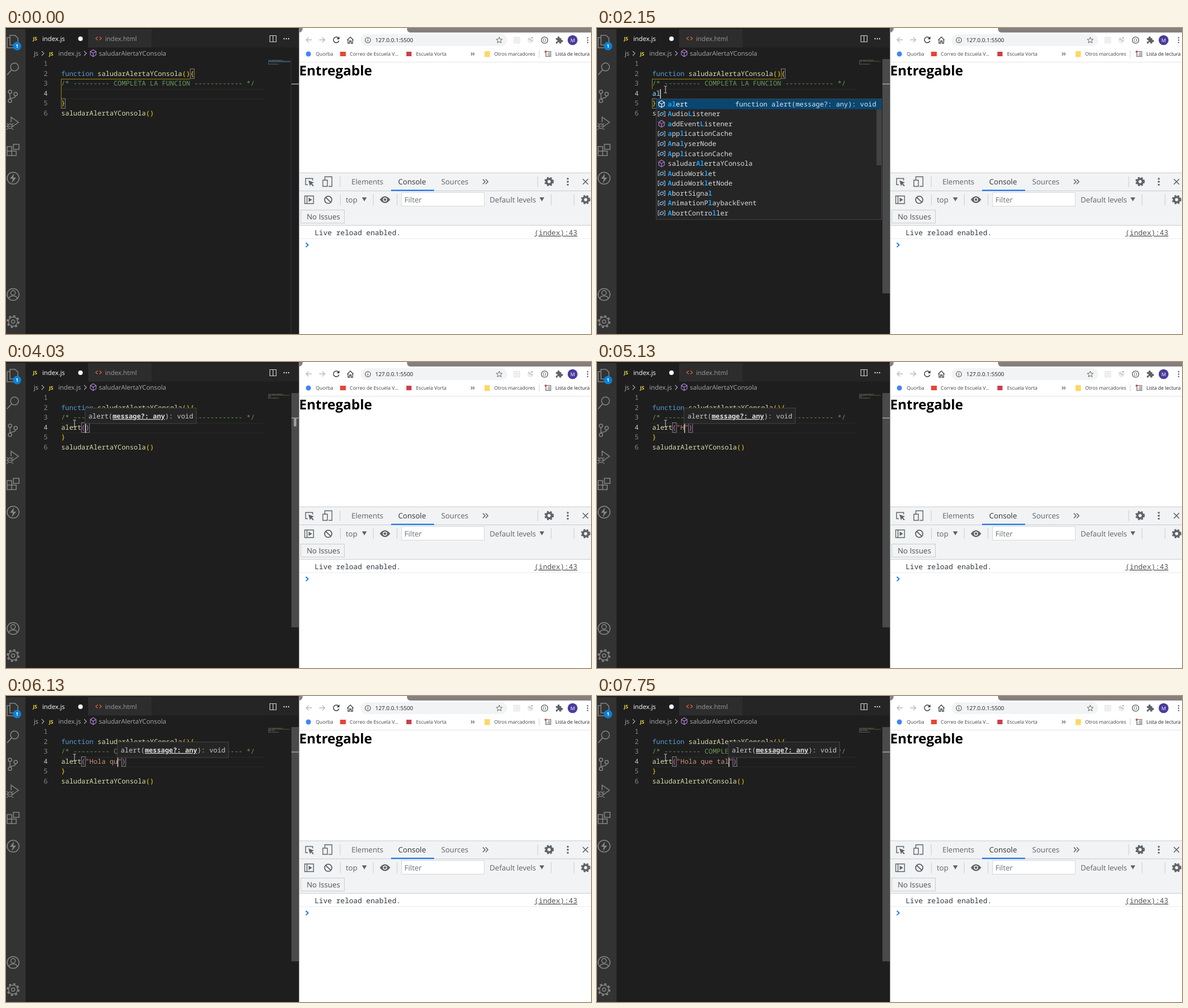
An HTML page for the animation above (8000 ms loop, 1033x542 px).

```html
<!DOCTYPE html>
<html lang="es">
<head>
<meta charset="utf-8">
<title>Entregable</title>
<style>
html, body { margin: 0; width: 100%; height: 100%; overflow: hidden; background: #fff; }
svg { display: block; }
text { white-space: pre; text-rendering: geometricPrecision; }
.m { font: 500 11.86px "Noto Sans Mono", monospace; }
.u { font: 11.3px "Open Sans", "Noto Sans", sans-serif; }
.d { font: 13.1px "Open Sans", "Noto Sans", sans-serif; }
.b { font: 8.6px "Open Sans", "Noto Sans", sans-serif; }
.c { font: 12.67px "Noto Sans Mono", monospace; }
</style>
</head>
<body>
<svg id="stage" width="1033" height="542" viewBox="0 0 1033 542">
  <g id="fixed"></g><g id="live"></g>
</svg>
<script>
const LOOP = 8000, CW = 7.116, X0 = 97.5, ROW = 17.6;
const colX = c => X0 + c * CW;
const lineY = n => 67 + (n - 1) * ROW;

const rect = (x, y, w, h, fill, more = '') =>
  `<rect x="${x}" y="${y}" width="${w}" height="${h}" fill="${fill}" ${more}/>`;
const frame = (x, y, w, h, fill, stroke) => rect(x, y, w, h, fill, `stroke="${stroke}"`);
const circle = (x, y, r, fill, more = '') =>
  `<circle cx="${x}" cy="${y}" r="${r}" fill="${fill}" ${more}/>`;
const ring = (x, y, r, stroke, w = 1.5, more = '') =>
  circle(x, y, r, 'none', `stroke="${stroke}" stroke-width="${w}" ${more}`);
const line = (d, stroke, w = 1.5, fill = 'none') =>
  `<path d="${d}" fill="${fill}" stroke="${stroke}" stroke-width="${w}"/>`;
const shape = (d, fill) => `<path d="${d}" fill="${fill}"/>`;
const esc = s => s.replace(/&/g, '&amp;').replace(/</g, '&lt;');
const text = (cls, x, y, s, fill, style = '') =>
  `<text class="${cls}" x="${x}" y="${y}" fill="${fill}" style="${style}">${esc(s)}</text>`;
// parts: [string, colour, extra attributes]
const rich = (x, y, parts) => `<text class="m" x="${x}" y="${y}">` +
  parts.map(([s, f, more = '']) => `<tspan fill="${f}" ${more}>${esc(s)}</tspan>`).join('') + '</text>';

function gear(x, y, r, color) {
  const step = 2 * Math.PI * r / 16;
  return ring(x, y, r * .62, color, r * .5) +
    ring(x, y, r * .95, color, r * .3, `stroke-dasharray="${step} ${step}"`);
}
const outlineGear = (x, y) => ring(x, y, 3, '#858585') + ring(x, y, 8, '#858585', 1.4) +
  ring(x, y, 10, '#858585', 2.6, 'stroke-dasharray="3.9 3.95"');
const cube = (x, y, color) =>
  line(`M${x} ${y - 6}l5 3v6l-5 3l-5 -3v-6zM${x - 5} ${y - 3}l5 3l5 -3M${x} ${y}v6`, color, 1.1);
const dots = (x, y, dx, dy, color, r = 1.2) =>
  [-1, 0, 1].map(i => circle(x + i * dx, y + i * dy, r, color)).join('');
const jsTag = (x, y) => text('b', x, y, 'JS', '#ead94a', 'font-weight:700');

function editor() {
  const g = '#858585', t = '#a9a9a9';
  let s = rect(0, 0, 517, 542, '#1e1e1e') + rect(0, 2, 34.5, 540, '#333333') +
    rect(34.5, 2, 482.5, 32.5, '#252526') + rect(35, 2, 110, 33, '#1e1e1e') + rect(145, 2, 112, 32.5, '#2d2d2d');
  // activity bar
  s += line('M7 17v-4h9l5 5v12h-14zM7 17H2v18h12v-5', g) +
    circle(19.5, 32, 7.4, '#0a80d4') + text('b', 17, 35.2, '1', '#fff', 'font-weight:700') +
    ring(15, 69, 7, g) + line('M10 74L2 83', g, 1.8) +
    ring(7, 113, 3, g) + ring(17, 117, 3, g) + ring(7, 129, 3, g) + line('M7 116v10M17 120c0 5 -8 3 -10 6', g) +
    line('M9 167v-9l13 9l-10 7', g) + ring(7, 174, 4, g) + line('M3 174h8M1 169l3 2M13 169l-3 2M0 174h3M11 174h3M1 180l3 -2M13 180l-3 -2', g, 1.2) +
    line('M2 210h8v16h-8zM2 218h16v8h-16M13 206h10v9h-10z', g) +
    ring(12.5, 266, 10.5, g) + shape('M14 258l-7 9h5l-2 8l8 -10h-5z', g) +
    ring(12.5, 472, 10.5, g) + ring(12.5, 469, 4, g) + line('M5 479c2 -6 13 -6 15 0', g) + outlineGear(12.5, 520);
  // tabs and breadcrumbs
  s += jsTag(47.5, 22) + text('u', 64, 23, 'index.js', '#fff') + circle(131.5, 19, 4, '#fff') +
    line('M162 15.5l-3.5 3l3.5 3M165 15.5l3.5 3l-3.5 3', '#d0602f', 1.4) + text('u', 175, 23, 'index.html', '#9a9a9a') +
    line('M466 13.5h11v11h-11zM471.5 13.5v11', '#d0d0d0', 1.2) + dots(495, 19, 4, 0, '#d0d0d0') +
    text('u', 49, 49, 'js', t) + line('M63 41l4 4l-4 4M138 41l4 4l-4 4', t, 1.1) + jsTag(76, 48.5) +
    text('u', 92.5, 49, 'index.js', t) + cube(154, 44.5, '#b180d7') + text('u', 164, 49, 'saludarAlertaYConsola', t);
  // code
  for (let n = 1; n < 7; n++) s += text('m', 66.4, lineY(n), String(n), n === 4 ? '#c6c6c6' : g);
  s += line('M97 108.5h360M97 125.5h360', '#292929', 1) +
    rich(X0, lineY(2), [['function ', '#569cd6'], ['saludarAlertaYConsola', '#dcdcaa'], ['(){', '#ffd700']]) +
    text('m', X0, lineY(3), '/* ' + '-'.repeat(9) + ' COMPLETA LA FUNCION ' + '-'.repeat(12) + ' */', '#6a9955') +
    text('m', X0, lineY(5), '}', '#ffd700') +
    rich(X0, lineY(6), [['saludarAlertaYConsola', '#dcdcaa'], ['()', '#ffd700']]);
  return s;
}

function browser() {
  const k = '#5f6368', n = '#3c4043', sep = (x, y) => rect(x, y, 1, 19, '#cacdd1');
  let s = rect(517, 0, 516, 542, '#fff') + shape('M517 0h7q-1 8 -7 8z', '#85807e') +
    shape('M708 0H1033V8H714Q708 8 708 0z', '#85807e');
  // address bar
  s += line('M540 21h-10M534.5 16.5l-4.5 4.5l4.5 4.5M553 21h10M558.5 16.5l4.5 4.5l-4.5 4.5', '#b9bbbe', 1.4) +
    line('M587.5 18.5a5 5 0 1 0 .5 4', n, 1.5) + shape('M588.8 15v5h-5z', n) +
    line('M602.5 21.5l5.5 -5.5l5.5 5.5M604 20.5v6.5h2.7v-4h2.7v4h2.7v-6.5', n, 1.3) +
    rect(626, 11, 259, 21, '#f1f3f4', 'rx="10.5"') + ring(639, 21.5, 4.7, k, 1.2) + line('M639 20.5v3.5M639 18.4v1.2', k, 1.2) +
    text('b', 652, 25.2, '127.0.0.1:5500', '#202124', 'font-size:9.9px') +
    line('M871 16.3l1.5 3.5l3.8 .3l-2.9 2.5l.9 3.7l-3.3 -2l-3.3 2l.9 -3.7l-2.9 -2.5l3.8 -.3z', k, 1) +
    frame(897, 16.5, 10, 10, '#f6f6f6', '#dedede') + ring(902, 21.5, 2.3, '#dedede', 1) +
    circle(926, 21.5, 5.5, '#ededed') + dots(926, 21, 2.5, 1.5, '#a5a5a5', .9) + circle(929, 17, 1, '#888') +
    ring(951, 21.5, 5.7, n, 1.1) + text('b', 948.1, 24.2, '()', n) +
    shape('M971 18h3a2 2 0 1 1 3.5 0h3v3.3a2 2 0 1 1 0 3.5v2.7h-3.5a1.7 1.7 0 1 0 -3 0h-3v-3.5a1.8 1.8 0 1 0 0 -3z', k) +
    circle(1000.5, 21.5, 8.7, '#4a3b9c') + text('b', 996.7, 24.7, 'M', '#fff') + dots(1027, 21.5, 0, 4.2, k, 1.2);
  // bookmarks
  s += circle(534, 46, 4.5, '#4285f4') + text('b', 547, 49.2, 'Quorba', n) +
    rect(590, 42, 10, 8, '#ea4335') + text('b', 607, 49.2, 'Correo de Escuela V...', n) +
    rect(707, 42, 9, 8, '#c9404c') + text('b', 724, 49.2, 'Escuela Vorta', n) +
    line('M821 43.5l2.5 2.5l-2.5 2.5M824.5 43.5l2.5 2.5l-2.5 2.5', k, 1.1) +
    rect(845, 41, 9.5, 10.5, '#fbd867', 'rx="1"') + text('b', 862, 49.2, 'Otros marcadores', n) + rect(941, 40, 1, 12, '#d0d2d5') +
    frame(953, 41.5, 9, 9, '#fff', k) + line('M957 44h4M957 46.3h4M957 48.6h4M954.3 46.3h1.4M954.3 48.6h1.4', k, 1) +
    circle(953, 42, 2, '#d94b3d') + text('b', 970, 49.2, 'Lista de lectura', '#202124') + rect(517, 60, 516, 1, '#e4e5e7') +
    text('u', 517.5, 84, 'Entregable', '#000', 'font-size:24px;font-weight:700');
  // developer panel
  s += rect(517, 256, 516, 94, '#f1f3f4') + rect(517, 256, 516, 1, '#cacdd1') + rect(517, 288, 516, 1, '#cacdd1') +
    rect(517, 349, 516, 1, '#cacdd1') + rect(680, 286.5, 76, 2.2, '#1a73e8');
  s += line('M541.5 270v-3.5h-12.5v11h4', k, 1.4) + shape('M534 270l10 3.8l-4 1.5l3.5 3.6l-1.5 1.5l-3.5 -3.6l-1.6 3.4z', k) +
    line('M563 269v-5.5h12.5v17h-6M559.5 269.5h8v11h-8z', k, 1.4) + sep(589.5, 263) +
    text('d', 610, 277, 'Elements', k) + text('d', 692.5, 277, 'Console', '#333') + text('d', 768.5, 277, 'Sources', k) +
    line('M842 268l4 4.3l-4 4.3M847 268l4 4.3l-4 4.3', k, 1.5) + sep(938.5, 263) +
    gear(959, 272, 7.6, k) + dots(992, 272.3, 0, 5.3, k, 1.7) + line('M1018.5 267.5l9.5 9.5M1028 267.5l-9.5 9.5', k, 1.6);
  s += line('M527.5 297.5h15.5v13.5h-15.5zM531.5 297.5v13.5', k, 1.4) + shape('M534.5 300.5l6 3.8l-6 3.8z', k) +
    ring(569, 304.3, 6.4, k, 1.8) + line('M564.5 300l9 8.7', k, 1.8) + sep(590, 294.5) +
    text('d', 600, 308.8, 'top', k) + shape('M628.5 300h8.5l-4.25 7z', k) + sep(648, 294.5) +
    shape('M660 304q9 -12 18.5 0q-9.5 12 -18.5 0z', k) + circle(669.2, 304, 3.7, '#f1f3f4') + circle(669.2, 304, 2.2, k) + sep(690, 294.5) +
    frame(698.5, 291.5, 146, 24, '#fff', '#d6d8db') + text('d', 703.5, 308.8, 'Filter', '#6b6f74') +
    text('d', 854, 308.8, 'Default levels', k) + shape('M942 300h8.5l-4.25 7z', k) + sep(962, 294.5) + sep(1002.5, 294.5) + gear(1023.5, 304, 7.6, k);
  s += frame(520.5, 322.5, 77, 23, '#f1f3f4', '#cacdd1') + text('d', 531, 339.2, 'No Issues', '#4c4f53') +
    text('c', 545, 367, 'Live reload enabled.', '#303942') +
    text('c', 933, 367, '(index):43', '#545454', 'text-decoration:underline') + rect(517, 372.5, 516, 1, '#ececec') +
    line('M529.5 380.5l4 3.8l-4 3.8', '#1a78e0', 1.8);
  // window edge
  return s + rect(517, 0, 1, 542, '#8a8a8a');
}

// [key time, time the parameter hint catches up]
const KEYS = [[1990], [2150], [2390], [2540], [2620], [3880, 4030], [4260, 4350], [4980, 5130], [5280, 5357],
  [5434, 5511], [5588, 5665], [5740, 5819], [5896, 5973], [6050, 6130], [6207, 6285], [6362, 6440], [6515, 6595],
  [6595, 6672], [6672, 6750]];
const CARET_OFF = [[0, 1045], [1510, 1990], [3490, 3880], [4730, 4980], [7200, 7750]];
const POINTER = [[230, 886, 510], [313, 700, 430], [396, 480, 330], [479, 300, 240], [562, 180, 175], [645, 123, 150],
  [728, 165, 160], [810, 253, 170], [960, 215, 150], [1045, 150, 118], [1130, 121, 109]];
const WORDS = ['alert', 'AudioListener', 'addEventListener', 'applicationCache', 'AnalyserNode', 'ApplicationCache',
  'saludarAlertaYConsola', 'AudioWorklet', 'AudioWorkletNode', 'AbortSignal', 'AnimationPlaybackEvent', 'AbortController'];
const LAST = ['alert', 'saludarAlertaYConsola', 'DeviceAcceleration', 'SpeechRecognitionAlternative'];
const METHODS = ['alert', 'addEventListener', 'saludarAlertaYConsola'];
const MESSAGE = 'Hola que tal';

// places of the typed letters inside a suggestion, or null
function match(word, key) {
  let at = /^a/i.test(word) ? 0 : word.indexOf('A');
  const hits = [];
  for (const ch of key) {
    at = word.toLowerCase().indexOf(ch, at);
    if (at < 0) return null;
    hits.push(at++);
  }
  return hits;
}

function suggestions(t) {
  const key = 'alert'.slice(0, t < 2150 ? 1 : t < 2390 ? 2 : t < 2620 ? 3 : 5);
  const words = key.length > 3 ? LAST : key.length > 2 ? WORDS.filter(w => match(w, key)).slice(0, 9) : WORDS;
  let s = frame(104.5, 125.5, 398, words.length * ROW + 2.4, '#252526', '#454545') + rect(105, 126, 397.5, ROW, '#094771');
  words.forEach((w, i) => {
    const y = 134.6 + i * 17.56, hits = match(w, key), fg = i ? '#dedede' : '#fff';
    s += METHODS.includes(w) ? cube(114, y, i ? '#b180d7' : '#fff') :
      line(`M110.5 ${y - 4}h-2.5v8h2.5M117.5 ${y - 4}h2.5v8h-2.5`, '#b5b5b5', 1.1) +
      line(`M111 ${y}l3.5 -2.5l2.7 1.3v2l-3.5 2.2l-2.7 -1.2z`, '#75beff', 1.2);
    s += rich(125, y + 4.1, [...w].map((ch, j) => hits.includes(j) ? [ch, '#18a3ff', 'font-weight="700"'] : [ch, fg]));
  });
  s += text('m', 244, 138.7, 'function alert(message?: any): void', '#d9e4ec');
  if (words.length > 9) s += rect(493.5, 144, 8.5, 99, '#424242');
  return s;
}

function hint(x) {
  const c = '#cccccc';
  return frame(x, 81.5, 196.5, 27.5, '#252526', '#454545') + rich(x + 6, 100, [['alert(', c],
    ['message?: any', '#e0e0e0', 'font-weight="700" text-decoration="underline"'], ['): void', c]]);
}

const bracketBox = (col, n) => frame(colX(col) + .2, lineY(n) - 12.2, 6.9, 17, 'none', '#858585');

function minimap(n, over) {
  const row = (y, x, w, c) => line(`M${x} ${y}h${w}`, c, 1).replace('/>', 'stroke-dasharray="5 .6 3 .5" opacity=".6"/>');
  return (over ? '' : rect(463, 58, 40, 3.2, '#24395c')) + row(57.2, 463, 7, '#569cd6') + row(57.2, 470, 19, '#a5a583') +
    row(59, 463, 38, '#6a9955') + (n ? row(60.8, 463, n * .8, '#b0a080') : '') + row(62.5, 463, 1, '#aaa') + row(64, 463, 19, '#a5a583');
}

function typedLine(n) {
  if (n < 6) return [['alert'.slice(0, n), n < 5 ? '#9cdcfe' : '#dcdcaa']];
  const str = n > 6 ? '"' + MESSAGE.slice(0, n - 7) + '"' : '';
  return [['alert', '#dcdcaa'], ['(', '#da70d6'], [str, '#ce9178'], [')', '#da70d6']];
}

function pointer(t) {
  const p = POINTER.filter(q => q[0] <= t).pop();
  if (!p) return '';
  const [, x, y] = p;
  return x < 503 ? line(`M${x - 2.5} ${y - 6}h2l.5 .6l.5 -.6h2M${x} ${y - 5.5}v11M${x - 2.5} ${y + 6}h2l.5 -.6l.5 .6h2`, '#d0d0d0', 1) :
    line(`M${x} ${y}v16l3.6 -3.4l2.6 5.4l2.4 -1l-2.5 -5.3h5z`, '#000', 1, '#fff');
}

function scene(t) {
  const n = KEYS.filter(k => k[0] <= t).length, over = t >= 396, call = n > 5;
  let s = minimap(n, over);
  s += over ? rect(504, 55, 13, 415, '#4a4a4a') : rect(503, 55, 1, 487, '#333');
  s += rect(504, 98.5, 13, 1.6, '#a0a0a0');
  if (n === 6) s += rect(508.3, 99, 4.4, 15, '#a0a0a0');
  if (call) s += bracketBox(5, 4) + bracketBox(n === 6 ? 6 : n + 1, 4);
  else s += line(`M325 90.5H97.5V${n ? 108 : 126}`, '#9c8612', 1) + bracketBox(32, 2) + bracketBox(0, 5);
  s += rich(X0, lineY(4), typedLine(n));
  if (!CARET_OFF.some(([a, b]) => t >= a && t < b)) s += rect(colX(n) - .5, 108.5, 1.5, 17, '#d4d4d4');
  if (t >= 2070 && t < 2950) s += suggestions(t);
  if (t >= 4030) s += hint(colX(n) - (t < KEYS[n - 1][1] ? 5.6 : .7));
  return s + pointer(t);
}

const live = document.getElementById('live');
document.getElementById('fixed').innerHTML = editor() + browser();
let shown = null;
function draw(now) {
  const s = scene(now % LOOP);
  if (s !== shown) live.innerHTML = shown = s;
  requestAnimationFrame(draw);
}
draw(0);
</script>
</body>
</html>
```
